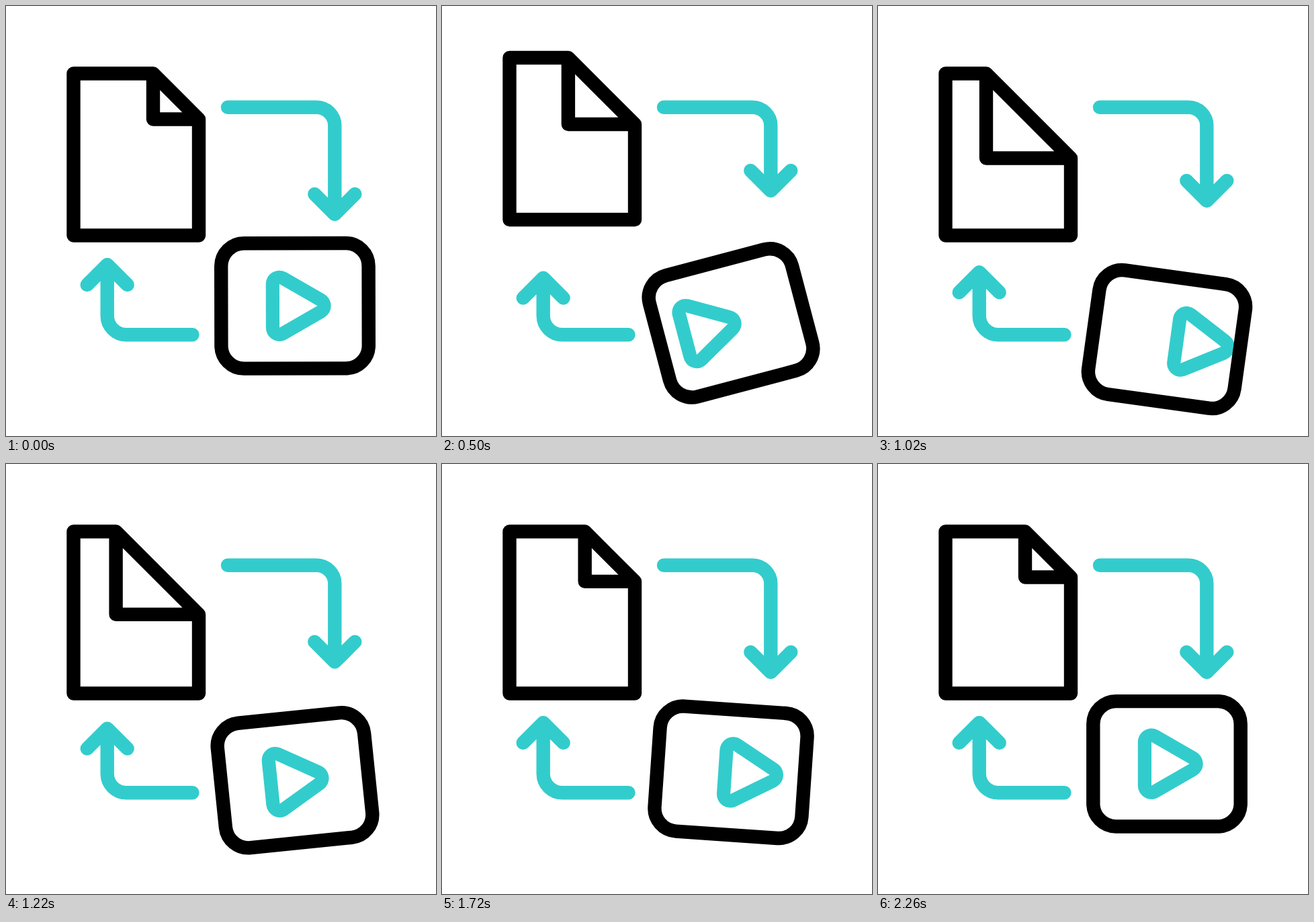
An HTML page for the animation above (2.4 s loop, 640 px wide and 640 px high).

```html
<!DOCTYPE html>
<html lang="en">
<head>
<meta charset="utf-8">
<title>File and video exchange</title>
<style>
  html, body { margin: 0; width: 100%; height: 100%; overflow: hidden; background: #fff; }
  svg { display: block; width: 100vw; height: 100vh; }
  .line { fill: none; stroke-width: 20.4; stroke-linecap: round; stroke-linejoin: round; }
  .ink { stroke: #000; }
  .teal { stroke: #3cc; }
  .play { fill: #fff; stroke: #3cc; stroke-width: 40.4; stroke-linejoin: round; paint-order: stroke; }
</style>
</head>
<body>
<svg viewBox="0 0 640 640">
  <path id="sheet" class="line ink"/>
  <path id="down" class="line teal"/>
  <path id="up" class="line teal"/>
  <g id="card">
    <path id="play" class="play" d="M-23 -32.5L33.5 0L-23 32.5Z"/>
    <rect class="line ink" x="-109.7" y="-93.2" width="219.4" height="186.4" rx="34"/>
  </g>
</svg>
<script>
const LOOP = 2400, STEP = 20;
const $ = id => document.getElementById(id);
const sheet = $('sheet'), down = $('down'), up = $('up'), card = $('card'), play = $('play');

// Eased rise from 0 to 1 between two times.
function ramp(t, from, to) {
  const u = Math.min(1, Math.max(0, (t - from) / (to - from)));
  return u * u * (3 - 2 * u);
}

// Rise to 1 and back to 0.
const bump = (t, from, peak, to) => ramp(t, from, peak) - ramp(t, peak, to);

// Back and forth from rest through evenly spaced peaks, then back to rest.
const swing = (t, start, beat, ...peaks) => peaks.reduce((sum, p, i) => {
  const from = start + i * beat;
  return sum + p * bump(t, from, from + beat, from + 2 * beat);
}, 0);

function drawSheet(t) {
  const fold = 68 + 58 * (ramp(t, 133, 833) - ramp(t, 1124, 1874));
  const x = 287 - fold, y = 100.5 + fold;
  sheet.setAttribute('d',
    `M100.5 100.5H${x}L287 ${y}V341.5H100.5ZM${x} 100.5V${y}H287`);
  sheet.setAttribute('transform', `translate(0 ${-50.3 * bump(t, 0, 315, 670)})`);
}

function drawArrows(t) {
  const pull = 45.5 * bump(t, 80, 690, 1300) + 37.5 * bump(t, 1100, 1400, 1700);
  const low = 310 - pull, high = 385 + pull * 0.56;
  down.setAttribute('d',
    `M330 150.7H462A27.3 27.3 0 0 1 489.3 178V${low}M459.3 ${low - 30}l30 30l30 -30`);
  up.setAttribute('d',
    `M277.5 489.3H179A28.3 28.3 0 0 1 150.7 461V${high}M120.7 ${high + 30}l30 -30l30 30`);
}

function drawCard(t) {
  const drop = swing(t, 25, 345, 54, -35, 53, -11, 13);
  const tilt = swing(t, -20, 440, -17.6, 14.6, -7.8, 4);
  const slide = swing(t, 230, 395, -50, 48, -52, 36);
  card.setAttribute('transform', `translate(430 ${446.3 + drop}) rotate(${tilt})`);
  play.setAttribute('transform', `translate(${slide} 0)`);
}

function tick() {
  const t = Math.floor(performance.now() % LOOP / STEP) * STEP;
  drawSheet(t);
  drawArrows(t);
  drawCard(t);
  requestAnimationFrame(tick);
}
tick();
</script>
</body>
</html>
```
